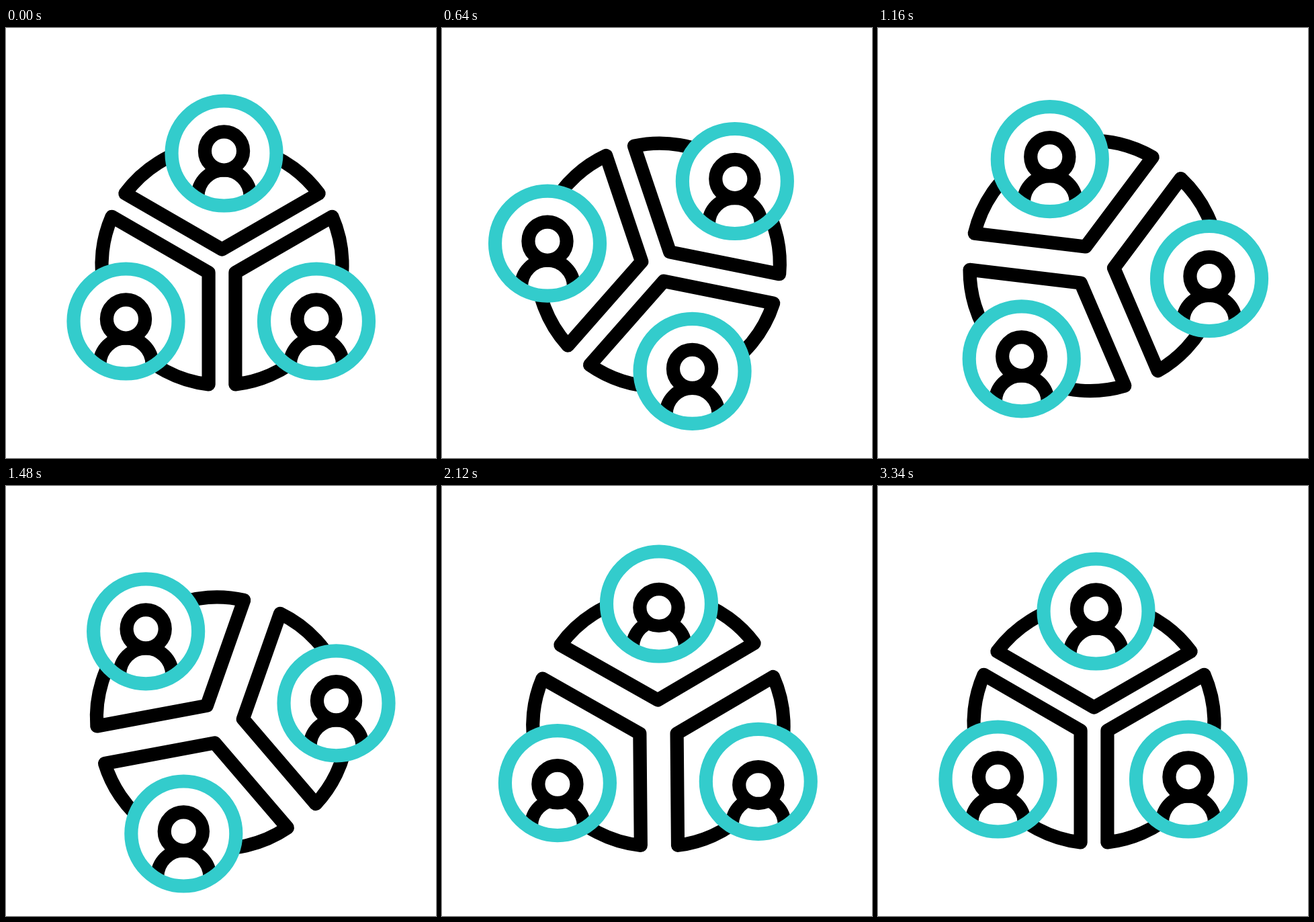
Recreate the animation shown at these times as an HTML page with a canvas. Size 640 by 640 pixels, loop 3.6 s.

```html
<!DOCTYPE html>
<html lang="en">
<head>
<meta charset="utf-8">
<title>Team wheel</title>
<style>
  html, body { margin: 0; width: 100%; height: 100%; overflow: hidden; background: #fff; }
  canvas { display: block; width: 640px; height: 640px; }
</style>
</head>
<body>
<canvas id="stage" width="640" height="640"></canvas>
<script>
const ctx = document.getElementById('stage').getContext('2d');
const LOOP = 3600, STEP = 20;
const CENTER = { x: 321.5, y: 353.2 };
const WHEEL_LIFT = 0.7;
const TEAL = '#33cccc', BLACK = '#000', WHITE = '#fff';
const RAD = Math.PI / 180;

// x, y: resting offset from the centre; spread: how far the slice travels outwards
const slices = [
  { axis: 0, x: 3, y: -166.7, spread: 11, headDelay: 360 },
  { axis: 120, x: 140.5, y: 83.3, spread: 9.3, headDelay: 162 },
  { axis: 240, x: -143, y: 83.3, spread: 8.5, headDelay: 0 }
];

// [time, degrees, degrees per ms]
const spinKeys = [
  [0, 0, 0], [230, -3.5, 0], [540, 20.3, 0.18], [640, 41.4, 0.245],
  [1160, 216.8, 0.35], [1480, 319.4, 0.25], [1640, 348.2, 0.15],
  [1880, 375, 0], [2120, 359.5, -0.075], [2290, 350.4, 0],
  [2500, 357.5, 0.025], [2700, 360, 0]
];
const spreadKeys = [[200, 0], [1500, 1], [2180, 1], [2560, -1.03], [2950, 0]];
const headWidthKeys = [[2120, 1], [2560, 0.945], [3340, 1]];

function sample(keys, t, blend) {
  if (t <= keys[0][0]) return keys[0][1];
  for (let i = 1; i < keys.length; i++) {
    const a = keys[i - 1], b = keys[i];
    if (t < b[0]) return blend(a, b, (t - a[0]) / (b[0] - a[0]));
  }
  return keys[keys.length - 1][1];
}

const sine = (a, b, u) => a[1] + (b[1] - a[1]) * (1 - Math.cos(Math.PI * u)) / 2;

function hermite(a, b, u) {
  const span = b[0] - a[0], v = 1 - u;
  return a[1] * (1 + 2 * u) * v * v + a[2] * span * u * v * v
       + b[1] * u * u * (3 - 2 * u) - b[2] * span * u * u * v;
}

function headOffset(t, delay) {
  return sample([[1480, 0], [1900, 9], [1900.1 + delay, 9], [2620 + delay, -9], [3340, 0]], t, sine);
}

function strokeArc(x, y, r, color, start = 0, end = 2 * Math.PI) {
  ctx.beginPath();
  ctx.arc(x, y, r, start, end);
  ctx.strokeStyle = color;
  ctx.stroke();
}

function fillDisc(x, y, r) {
  ctx.beginPath();
  ctx.arc(x, y, r, 0, 2 * Math.PI);
  ctx.fillStyle = WHITE;
  ctx.fill();
}

function drawWedge(slice, spread) {
  const half = Math.atan2(144.3, 106.3);
  ctx.save();
  ctx.rotate(slice.axis * RAD);
  ctx.translate(0, -spread * slice.spread);
  ctx.beginPath();
  ctx.moveTo(0, -23);
  ctx.arc(0, 0, 179, -Math.PI / 2 - half, -Math.PI / 2 + half);
  ctx.closePath();
  ctx.strokeStyle = BLACK;
  ctx.stroke();
  ctx.restore();
}

function drawPerson(slice, t, spin, spread) {
  const axis = slice.axis * RAD, d = spread * slice.spread;
  const x = slice.x + d * Math.sin(axis), y = slice.y - d * Math.cos(axis);
  const c = Math.cos(spin), s = Math.sin(spin);
  ctx.save();
  ctx.translate(x * c - y * s, x * s + y * c);
  fillDisc(0, 0, 80);
  strokeArc(0, 64, 39, BLACK, Math.PI, 2 * Math.PI);

  // The head squashes on the way down and stretches on the way up
  const drop = headOffset(t, slice.headDelay);
  ctx.save();
  ctx.translate(0, -3.5 + drop);
  ctx.scale(sample(headWidthKeys, t, sine), 1 - 0.0045 * drop);
  fillDisc(0, 0, 28);
  strokeArc(0, 0, 28.6, BLACK);
  ctx.restore();

  strokeArc(0, 0, 78, TEAL);
  ctx.restore();
}

function draw(t) {
  const spin = sample(spinKeys, t, hermite) * RAD;
  const spread = sample(spreadKeys, t, sine);
  ctx.fillStyle = WHITE;
  ctx.fillRect(0, 0, 640, 640);
  ctx.lineWidth = 20.2;
  ctx.lineJoin = 'round';
  ctx.save();
  ctx.translate(CENTER.x, CENTER.y);
  ctx.save();
  ctx.rotate(spin);
  ctx.translate(0, -WHEEL_LIFT);
  slices.forEach(slice => drawWedge(slice, spread));
  ctx.restore();
  slices.forEach(slice => drawPerson(slice, t, spin, spread));
  ctx.restore();
}

function tick() {
  const t = performance.now() % LOOP;
  draw(Math.floor(t / STEP) * STEP);
  requestAnimationFrame(tick);
}
tick();
</script>
</body>
</html>
```
